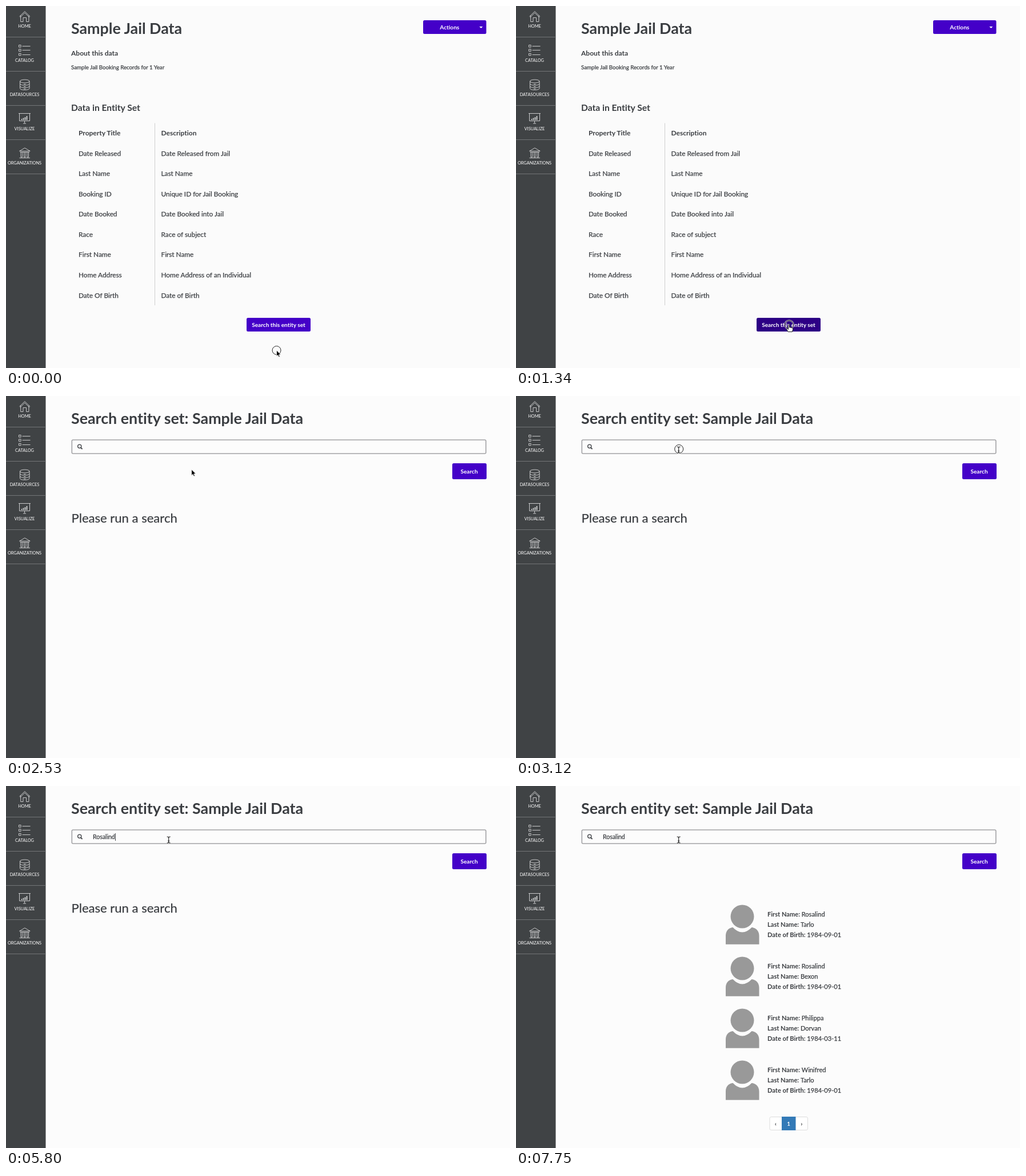
An HTML page that plays this animation: 882x635 px, repeating every 8 s.

```html
<!DOCTYPE html>
<html lang="en">
<head>
<meta charset="utf-8">
<title>Entity set search</title>
<style>
  html, body { margin: 0; width: 100%; height: 100%; overflow: hidden; background: #fbfbfb; }
  svg { display: block; width: 882px; height: 635px; }
  text {
    font-family: Lato, "Open Sans", sans-serif; font-variant-ligatures: none; white-space: pre;
    color: #3a3d41; fill: currentColor; stroke: currentColor; stroke-width: .25px;
  }
  .b { font-weight: 700; stroke-width: 0; }
  .mid { text-anchor: middle; }
  .white { color: #fff; stroke-width: 0; }
  .icon { fill: none; stroke: #d8d9da; stroke-width: .9; }
</style>
</head>
<body>
<svg viewBox="0 0 882 635" xmlns="http://www.w3.org/2000/svg">
  <rect id="backdrop" width="882" height="635" fill="#fbfbfb"/>
  <g id="sidebar">
    <rect width="69.5" height="635" fill="#404345"/>
    <g class="icon">
      <path d="M23.5 18.5L32.8 9.5L42.2 18.5M25.7 17V27.5H30V20.5H35.6V27.5H39.9V17M24.5 20L32.8 12L41.2 20"/>
      <path d="M22.5 68.5h3.6v3.6h-3.6zM22.5 75.8h3.6v3.6h-3.6zM22.5 83.2h3.6v3.6h-3.6zM28.5 70.5H42.5M28.5 77.5H42.5M28.5 85.5H42.5"/>
      <path d="M24.5 132V144.5C24.5 148.2 41 148.2 41 144.5V132M24.5 132C24.5 128.2 41 128.2 41 132S24.5 135.8 24.5 132M24.5 136.2C24.5 140 41 140 41 136.2M24.5 140.5C24.5 144.2 41 144.2 41 140.5M31 137.2h3.5M31 141.5h3.5M31 145.5h3.5"/>
      <path d="M22 188.5H43M23.5 188.5V201.5H41.5V188.5M32.5 201.5V205.5M30 206H35"/>
      <path d="M27.5 200v-2M30.500 200v-3.500M33.500 200v-5M36.500 200v-7" stroke-width="1.700"/>
      <path d="M23.5 254.5L32.8 249L42.2 254.5ZM24.500 256.500H41M26 257v8h2.500v-8M31.500 257v8H34v-8M37 257v8h2.500v-8M23.500 266.500H42"/>
    </g>
  </g>

  <g id="overview">
    <rect x="730" y="25" width="110.500" height="24" rx="2.500" fill="#4400c8"/>
    <path d="M828.300 36h6l-3 3z" fill="#fff"/>
    <path d="M260.500 205.500V525" stroke="#cfcfcf"/>
    <rect id="openSearch" x="421" y="547" width="112" height="24" rx="2.500"/>
  </g>

  <g id="search">
    <rect x="115.300" y="77" width="724.500" height="24" rx="2" fill="none" stroke="#a2a2a5" stroke-width="1.600"/>
    <g fill="none" stroke="#3c3f43">
      <circle cx="128.700" cy="88.200" r="3.100" stroke-width="1.300"/>
      <path d="M131 90.600L133.500 93.100" stroke-width="1.700"/>
    </g>
    <rect x="781" y="118" width="60" height="28" rx="2.500" fill="#4400c8"/>
    <path id="caret" d="M.5 83V96" stroke="#3c3f43"/>
  </g>

  <g id="results">
    <rect x="444" y="580.500" width="66.500" height="23" rx="2.500" fill="#fff" stroke="#ddd"/>
    <rect x="465" y="580" width="24.500" height="24" fill="#337ab7"/>
  </g>

  <g id="pointer">
    <g id="ring" fill="none">
      <circle r="7.500" stroke="#fff" stroke-width="2.400" opacity=".75"/>
      <circle r="7.500" stroke="#222"/>
    </g>
    <path id="arrow" d="M0 0V10.500L2.400 8.300L4 12L5.800 11.200L4.200 7.600H7.500Z" fill="#000" stroke="#fff" stroke-width=".8"/>
    <path id="hand" d="M-1.800 12.500L-4.300 8.500C-5 7 -3.500 6.300 -2.600 7.300L-1.600 8.300V1.500C-1.600 0 .5 0 .5 1.500V5C2 4.300 2.700 4.600 2.900 5.400C4.200 4.800 4.900 5.200 5 6C6.200 5.700 6.800 6.300 6.800 7.300C6.800 9.500 5.800 10.500 5.500 12.500Z" fill="#fff" stroke="#000" stroke-width=".9"/>
    <g id="beam" fill="none">
      <path id="beamShape" d="M-3.500 -4Q-.5 -4 -.5 -2.500Q-.5 -4 2.500 -4M-.5 -2.500V5.500M-3.500 7Q-.5 7 -.5 5.500Q-.5 7 2.500 7M-2 3.500H1" stroke="#fff" stroke-width="2.400"/>
      <path d="M-3.500 -4Q-.5 -4 -.5 -2.500Q-.5 -4 2.500 -4M-.5 -2.500V5.500M-3.500 7Q-.5 7 -.5 5.500Q-.5 7 2.500 7M-2 3.500H1" stroke="#111" stroke-width="1.100"/>
    </g>
  </g>
</svg>
<script>
const LOOP = 8000;
const QUERY = 'Rosalind';
const $ = id => document.getElementById(id);

function add(parent, tag, attrs, content = '') {
  const el = document.createElementNS('http://www.w3.org/2000/svg', tag);
  for (const key in attrs) el.setAttribute(key, attrs[key]);
  el.textContent = content;
  return parent.appendChild(el);
}
const label = (parent, x, y, size, content, cls = '') =>
  add(parent, 'text', { x, y, 'font-size': size, class: cls }, content);

['HOME', 'CATALOG', 'DATASOURCES', 'VISUALIZE', 'ORGANIZATIONS'].forEach((name, i) => {
  label($('sidebar'), 32.5, 38.4 + 60 * i, 7.35, name, 'mid white');
  add($('sidebar'), 'path', { d: `M0 ${54.5 + 60 * i}H69.5`, stroke: '#737577' });
});

const overview = $('overview');
label(overview, 114, 49.3, 26.8, 'Sample Jail Data', 'b');
label(overview, 114, 87.2, 12, 'About this data', 'b');
label(overview, 114, 110.8, 9.7, 'Sample Jail Booking Records for 1 Year');
label(overview, 114, 184.2, 15.6, 'Data in Entity Set', 'b');
label(overview, 776.3, 40.7, 10.1, 'Actions', 'b mid white');
label(overview, 477, 562.7, 10.1, 'Search this entity set', 'b mid white');
[
  ['Property Title', 'Description'],
  ['Date Released', 'Date Released from Jail'],
  ['Last Name', 'Last Name'],
  ['Booking ID', 'Unique ID for Jail Booking'],
  ['Date Booked', 'Date Booked into Jail'],
  ['Race', 'Race of subject'],
  ['First Name', 'First Name'],
  ['Home Address', 'Home Address of an Individual'],
  ['Date Of Birth', 'Date of Birth'],
].forEach((row, i) => row.forEach((cell, col) =>
  label(overview, col ? 271.5 : 127, 227.1 + 35.55 * i, i ? 11.8 : 12, cell, i ? '' : 'b')));

const search = $('search');
const title = label(search, 114, 49.3, 26.8, '', 'b');
const typed = label(search, 152, 93.2, 10.5, '');
label(search, 810.5, 136, 10.1, 'Search', 'b mid white');
const prompt = label(search, 114.5, 222, 22.05, 'Please run a search');

const results = $('results');
[
  [QUERY, 'Tarlo', '1984-09-01'],
  [QUERY, 'Bexon', '1984-09-01'],
  ['Philippa', 'Dorvan', '1984-03-11'],
  ['Winifred', 'Tarlo', '1984-09-01'],
].forEach((person, i) => {
  const card = add(results, 'g', { transform: `translate(0 ${91 * i})` });
  add(card, 'circle', { cx: 396, cy: 229, r: 20.5, fill: '#999' });
  add(card, 'path', {
    d: 'M367 277.8V263C367 254 372 249 379.5 248Q396 265 412.5 248C420 249 425.5 254 425.5 263V277.8Z',
    fill: '#999',
  });
  ['First Name: ', 'Last Name: ', 'Date of Birth: '].forEach((field, j) => {
    const line = label(card, 440, 229.3 + 17.8 * j, 11.1, '');
    add(line, 'tspan', { class: 'b' }, field);
    add(line, 'tspan', {}, person[j]);
  });
});
label(results, 454.5, 595.7, 9.8, '‹', 'mid');
label(results, 477.2, 595.9, 9.8, '1', 'b mid white');
label(results, 500, 595.7, 9.8, '›', 'mid');

// [start, x, y, shape, ring]
const POINTER = [
  [0, 473.5, 604, 'arrow', true],
  [150, 473.5, 604, 'arrow'],
  [450, 473.5, 603, 'arrow'],
  [600, 474, 599, 'arrow'],
  [750, 475, 592, 'arrow'],
  [900, 476, 581, 'arrow'],
  [1050, 477, 566, 'hand'],
  [1190, 478, 559, 'hand'],
  [1340, 478, 559, 'hand', true],
  [1490, 476.7, 559, 'arrow'],
  [2090, 448, 424, 'arrow'],
  [2240, 362, 212, 'arrow'],
  [2390, 337, 152, 'arrow'],
  [2530, 324.7, 129, 'arrow'],
  [2680, 322, 118, 'arrow'],
  [2830, 308, 97, 'beam'],
  [2970, 285.2, 93, 'beam'],
  [3120, 285.2, 93, 'beam', true],
  [3260, 285.2, 93, 'beam'],
];
const TYPING = [[0, 0], [4910, 1], [5210, 3], [5360, 4], [5660, 6], [5800, 8]];
const CARET = [[0, false], [4160, true], [4610, false], [4910, true], [6850, false], [7300, true], [7750, false]];

const at = (steps, t) => steps.findLast(step => step[0] <= t);
const show = (el, on) => { el.style.display = on ? '' : 'none'; };

function render(t) {
  const searching = t >= 1490;
  show(overview, !searching);
  show(search, searching);
  show(results, t >= 6250);
  show(prompt, t < 6250);
  $('backdrop').setAttribute('fill', searching ? '#fcfcfc' : '#fbfbfb');

  title.textContent = 'Search entity set' + (t >= 1790 ? ': Sample Jail Data' : '');
  typed.textContent = QUERY.slice(0, at(TYPING, t)[1]);
  const caretOn = at(CARET, t)[1];
  show($('caret'), caretOn);
  if (caretOn) {
    const x = 152 + Math.round(typed.getComputedTextLength());
    $('caret').setAttribute('transform', `translate(${x} 0)`);
  }

  const [, x, y, shape, ring] = at(POINTER, t);
  $('openSearch').setAttribute('fill', shape === 'hand' ? '#2d0085' : '#4400c8');
  $('pointer').setAttribute('transform', `translate(${x} ${y})`);
  for (const id of ['arrow', 'hand', 'beam']) show($(id), id === shape);
  show($('ring'), ring);
}

const start = performance.now();
function tick() {
  render((performance.now() - start) % LOOP);
  requestAnimationFrame(tick);
}
tick();
</script>
</body>
</html>
```
